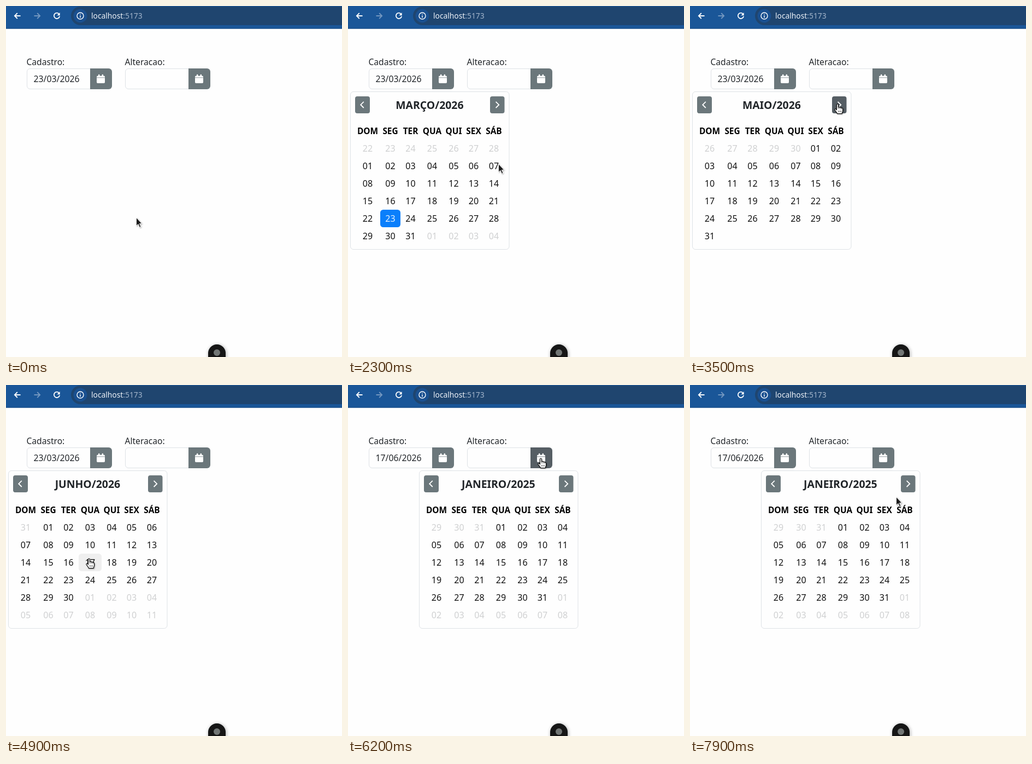
An HTML page that plays this animation: 615 px wide and 641 px high, repeating every 8000 ms.

```html
<!DOCTYPE html>
<html lang="pt-BR">
<head>
<meta charset="utf-8">
<title>Calendário</title>
<style>
html, body { margin: 0; width: 100%; height: 100%; overflow: hidden; background: #fefefe; }
svg { display: block; width: 100%; height: 100%; }
text { font-family: "Noto Sans", "Open Sans", sans-serif; font-size: 16px; fill: #212529; }
.label { font-size: 15.6px; }
.date { font-size: 15.8px; }
.url { font-size: 13.8px; fill: #eef3f9; }
.port { fill: #a4b6cc; }
.mid { text-anchor: middle; }
.title { font-size: 19.4px; font-weight: 600; }
.head { font-size: 15.4px; font-weight: 600; fill: #000; }
.day { fill: #111; }
.muted { fill: #cfd0d1; }
.picked { fill: #e6f2ff; }
.box { fill: #fefefe; stroke: #dee2e6; }
.btn { fill: #6b777b; }
.btn.hot { fill: #565e64; }
.line { fill: none; stroke: #fff; stroke-width: 1.8; stroke-linecap: round; stroke-linejoin: round; }
.nav { stroke-linecap: butt; stroke-linejoin: miter; }
</style>
</head>
<body>
<svg viewBox="0 0 615 641" preserveAspectRatio="none">
  <defs>
    <g id="icon" fill="#fff">
      <path d="M3 1a1 1 0 0 1 2.4 0V2.4H9.6V1A1 1 0 0 1 12 1V2.4H13.2A1.8 1.8 0 0 1 15 4.2V5.4H0V4.2A1.8 1.8 0 0 1 1.8 2.4H3Z"/>
      <path d="M0 6.2H15V14.2A1.8 1.8 0 0 1 13.2 16H1.8A1.8 1.8 0 0 1 0 14.2Z"/>
    </g>
    <path id="field" class="box" d="M116 .5H6a5.5 5.5 0 0 0-5.5 5.5V32a5.5 5.5 0 0 0 5.5 5.5H116"/>
    <path id="side" d="M0 0H34a6 6 0 0 1 6 6V32a6 6 0 0 1-6 6H0Z"/>
    <filter id="soft" x="-50%" y="-50%" width="200%" height="200%">
      <feDropShadow dx="1" dy="1" stdDeviation="1" flood-opacity=".35"/>
    </filter>
    <filter id="glow" x="-50%" y="-50%" width="200%" height="200%">
      <feDropShadow dx="1" dy="1" stdDeviation="3" flood-opacity=".35"/>
    </filter>
  </defs>

  <rect width="615" height="641" fill="#fefefe"/>
  <rect width="615" height="41.5" fill="#1a5698"/>
  <rect y="40.5" width="615" height="1" fill="#174b86"/>
  <rect x="119" y="1" width="530" height="34" rx="17" fill="#1f456f"/>
  <circle cx="136" cy="18" r="12.5" fill="#1a5090"/>
  <path class="line nav" d="M26.5 18H16M20.8 13L15.8 18L20.8 23"/>
  <path class="line nav" d="M51.5 18H62M57.2 13L62.2 18L57.2 23" style="stroke:#7397c0"/>
  <path class="line" d="M97.2 14.6A5.2 5.2 0 1 0 98 19.4"/>
  <path d="M98.6 12V17.2H93.4Z" fill="#fff"/>
  <g class="line" style="stroke-width:1.4">
    <circle cx="136" cy="18" r="6"/>
    <path d="M136 17.6V21M136 15V15.2"/>
  </g>
  <text class="url" x="156" y="23">localhost<tspan class="port">:5173</tspan></text>

  <text class="label" x="37.5" y="108">Cadastro:</text>
  <text class="label" x="217.5" y="108">Alteracao:</text>
  <use href="#field" x="38" y="114"/>
  <use href="#field" x="218" y="114"/>
  <use id="btnA" class="btn" href="#side" x="154" y="114"/>
  <use id="btnB" class="btn" href="#side" x="334" y="114"/>
  <use href="#icon" x="166" y="125"/>
  <use href="#icon" x="346" y="125"/>
  <text id="date" class="date" x="50.5" y="139"></text>

  <path d="M370 645V634a16 16 0 0 1 32 0V645Z" fill="#121414" filter="url(#glow)"/>
  <circle cx="386" cy="633" r="6" fill="#727675"/>

  <g id="cal">
    <rect class="box" x="4.5" y="156.5" width="290.5" height="288" rx="5.5"/>
    <rect class="btn" x="13" y="165" width="27" height="31" rx="4"/>
    <rect id="next" class="btn" x="260" y="165" width="26.5" height="31" rx="4"/>
    <path class="line nav" d="M28.8 174.8L23.2 180.4L28.8 186"/>
    <path class="line nav" d="M270.6 174.8L276.2 180.4L270.6 186"/>
    <text id="title" class="title mid" x="149.4" y="187.8"></text>
    <rect id="mark" height="32" rx="5.5"/>
    <g id="grid"></g>
  </g>

  <g id="cursor" filter="url(#soft)">
    <path id="arrow" d="M.5 .5V15.6L4 12.4L6.6 18.4L9 17.3L6.4 11.5H10.8Z" fill="#1c1c1c" stroke="#fff" stroke-width=".9"/>
    <g id="hand">
      <path d="M-1.6 1.2C-1.6-.4 1.2-.4 1.3 1.2V6.2C2 5 4 5.2 4.2 6.6C5.2 5.8 6.8 6.2 7 7.4C8.2 6.8 9.6 7.6 9.6 9V12.4C9.6 14.2 8.3 15 8.3 17.6H-.6C-.8 15.4-3.4 13.6-4.8 11C-5.6 9.4-3.8 8.4-2.8 9.4L-1.6 10.8Z" fill="#fff" stroke="#111" stroke-width="1.2" stroke-linejoin="round"/>
      <path d="M1.4 6.4V9M4.2 7V9.4M7 7.8V9.8M1.6 12V15M4 12V15M6.3 12V15" stroke="#333" stroke-width=".8"/>
    </g>
  </g>
</svg>
<script>
const $ = id => document.getElementById(id);
const LOOP = 8000, STEP = 100;
const LEFT = 13, TOP = 244, ROW = 32;
const OPEN = 1000, PICK = 5200, REOPEN = 6100, CLICKS = [3100, 3400, 4300];
const WEEK = ['DOM', 'SEG', 'TER', 'QUA', 'QUI', 'SEX', 'SÁB'];

let edge = LEFT;
const COLS = [46, 37, 37, 42, 37, 36, 38].map(w => ({ x: edge, w, mid: edge + w / 2, end: edge += w }));

// Pointer moves: start, end, target point, bend point
const HOME = [238, 386];
const MOVES = [
  [300, 1000, [173, 134], [200, 260]],
  [2000, 2300, [275, 288], [210, 200]],
  [2400, 2900, [270, 179], [327, 225]],
  [4300, 4900, [152, 317], [250, 230]],
  [5300, 5400, [172, 291], [162, 304]],
  [5500, 5980, [353, 134], [290, 244]],
  [6300, 6900, [236, 357], [130, 290]],
  [6900, 7200, [237, 361], [236, 359]],
  [7200, 7900, [377, 204], [300, 290]]
];

function pointer(t) {
  let from = HOME;
  for (const [start, end, to, bend] of MOVES) {
    if (t < start) break;
    const u = Math.min(1, (t - start) / (end - start));
    const k = 1 - (1 - u) ** 3;
    from = from.map((a, i) => (1 - k) ** 2 * a + 2 * k * (1 - k) * bend[i] + k * k * to[i]);
  }
  return from;
}

// A Sunday counts as day 7; short months get one more week
function monthInfo(year, month) {
  const first = new Date(year, month, 1), last = new Date(year, month + 1, 0);
  const lead = first.getDay() || 7;
  const days = last.getDate();
  let count = lead + days + Math.max(0, 6 - (last.getDay() || 7));
  if (count <= 35) count += 7;
  const name = first.toLocaleString('pt-BR', { month: 'long' }).toUpperCase();
  return { title: `${name}/${year}`, lead, days, count, before: new Date(year, month, 0).getDate() };
}

function addText(cls, x, y, str) {
  const el = document.createElementNS('http://www.w3.org/2000/svg', 'text');
  el.setAttribute('class', cls + ' mid');
  el.setAttribute('x', x);
  el.setAttribute('y', y);
  el.textContent = str;
  $('grid').append(el);
}

function fillMonth({ title, lead, days, count, before }, picked) {
  $('title').textContent = title;
  $('grid').replaceChildren();
  WEEK.forEach((name, i) => addText('head', COLS[i].mid, 234, name));
  for (let i = 0; i < count; i++) {
    const n = i - lead + 1;
    const inside = n > 0 && n <= days;
    const value = n < 1 ? before + n : inside ? n : n - days;
    const cls = i === picked ? 'picked' : inside ? 'day' : 'muted';
    addText(cls, COLS[i % 7].mid, TOP + 22 + ROW * Math.floor(i / 7), String(value).padStart(2, '0'));
  }
}

const within = (x, y, l, t, w, h) => x >= l && x < l + w && y >= t && y < t + h;

function cellAt(x, y, count) {
  if (!within(x, y, LEFT, TOP, 261, 6 * ROW)) return -1;
  const i = COLS.findIndex(c => x < c.end) + 7 * Math.floor((y - TOP) / ROW);
  return i < count ? i : -1;
}

const show = (id, on) => $(id).style.display = on ? '' : 'none';

let shown = '', info;
function draw(t) {
  const [x, y] = pointer(t);
  const second = t >= PICK;
  const open = (t >= OPEN && !second) || t >= REOPEN;
  const shift = second ? 126 : 0;
  const year = second ? 2025 : 2026;
  const month = second ? 0 : 2 + CLICKS.filter(c => c <= t).length;
  const picked = month === 2 ? 29 : -1;
  if (shown !== `${month}/${year}`) {
    shown = `${month}/${year}`;
    info = monthInfo(year, month);
    fillMonth(info, picked);
  }

  const hot = {
    btnA: within(x, y, 154, 114, 40, 38),
    btnB: within(x, y, 334, 114, 40, 38),
    next: open && within(x - shift, y, 260, 165, 26, 31)
  };
  for (const id in hot) $(id).classList.toggle('hot', hot[id]);

  const cell = open ? cellAt(x - shift, y, info.count) : -1;
  const marked = picked < 0 ? cell : picked;
  show('mark', marked >= 0);
  if (marked >= 0) {
    const col = COLS[marked % 7];
    $('mark').setAttribute('x', col.x);
    $('mark').setAttribute('width', col.w);
    $('mark').setAttribute('y', TOP + ROW * Math.floor(marked / 7));
    $('mark').setAttribute('fill', picked < 0 ? '#efefef' : '#0a7ffb');
  }

  $('date').textContent = second ? '17/06/2026' : '23/03/2026';
  show('cal', open);
  $('cal').setAttribute('transform', `translate(${shift})`);

  const hand = cell >= 0 || Object.values(hot).includes(true);
  show('hand', hand);
  show('arrow', !hand);
  $('cursor').setAttribute('transform', `translate(${Math.round(x)} ${Math.round(y)})`);
}

const begin = performance.now();
function tick() {
  const t = (performance.now() - begin) % LOOP;
  draw(Math.floor(t / STEP) * STEP);
  requestAnimationFrame(tick);
}
tick();
</script>
</body>
</html>
```
